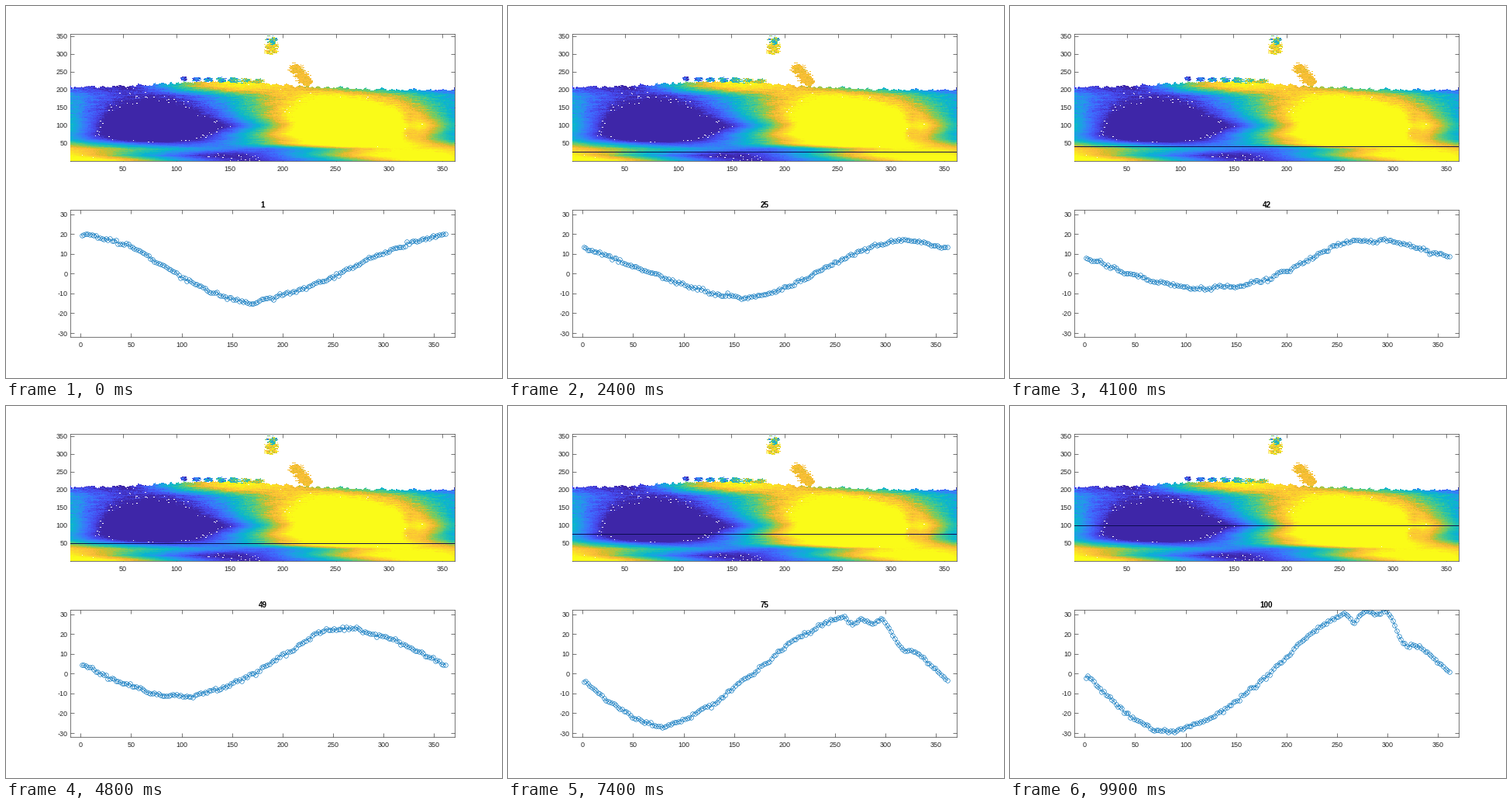
These frames come from a looping animation (640x480 px, 10 s). A matplotlib script:

```python
import numpy as np
import matplotlib.pyplot as plt
from matplotlib.animation import FuncAnimation
from matplotlib.colors import LinearSegmentedColormap

FRAMES = 100
ROWS, COLS = 355, 361
DPI = 100
INK = "#262626"
BLUE = "#0072bd"
PX = 72 / DPI  # one pixel in points

plt.rcParams.update({
    "font.family": "Liberation Sans",
    "font.size": 9 * PX,
    "axes.unicode_minus": False,
    "axes.linewidth": 0.45,
    "axes.edgecolor": INK,
})

rng = np.random.default_rng(7)
cols = np.arange(1, COLS + 1)
rows = np.arange(1, ROWS + 1)
x, y = np.meshgrid(cols, rows)


def smooth(a, n):
    """Moving average along the last axis, with edge padding."""
    pad = [(0, 0)] * (a.ndim - 1) + [(n // 2, n // 2)]
    return np.apply_along_axis(np.convolve, -1, np.pad(a, pad, "edge"),
                               np.ones(n) / n, "valid")


def ease(t):
    return 0.35 * t + 0.65 * (0.5 - 0.5 * np.cos(np.pi * t))


def wave(valley, low, peak, high, rise=1.0, fall=1.0):
    """One 360-degree swing between a valley and a peak."""
    turn = (cols - valley) % 360
    span = peak - valley
    up = ease(np.clip(turn / span, 0, 1) ** rise)
    down = ease(np.clip((turn - span) / (360 - span), 0, 1) ** fall)
    return smooth(low + (high - low) * (up - down), 7)


def bell(center, width):
    return np.exp(-((cols - center) / width) ** 2)


# Swing at a few ranges; the rows between are blended.
swings = {
    1: wave(165, -14.5, 368, 20),
    16: wave(147, -16, 320, 20),
    34: wave(180, -9, 312, 15),
    49: wave(92, -11.5, 257, 24, rise=1.35),
    62: wave(78, -21.5, 278, 26.5, fall=0.85),
    75: wave(77, -27, 265, 30),
    100: wave(75, -29.5, 265, 32, rise=1.25, fall=1.15),
    125: wave(80, -25, 262, 28),
    182: wave(75, -14.5, 240, 15.5),
    208: wave(55, -15, 160, 15, rise=0.8, fall=0.85),
}


def build_field():
    table = np.array(list(swings.values()))
    base = np.array([np.interp(rows, list(swings), c) for c in table.T]).T
    notch = 5 * bell(298, 8) - 6 * bell(266, 5) - 6 * bell(317, 9)
    base += np.interp(rows, [50, 80, 110, 150], [0, 1, 1, 0])[:, None] * notch
    grain = rng.normal(0, 0.38, (ROWS, COLS))
    drift = smooth(rng.normal(0, 1.3, (ROWS, COLS)), 9)
    gain = np.interp(rows, [100, 150], [1, 2])[:, None]
    return base + gain * (grain + drift)


def build_map(field):
    """Field as displayed: skyline cut off, clumps above it, stray gaps."""
    img = field.copy()
    skyline = 207 - 0.022 * cols + 19 * bell(145, 75)
    skyline += smooth(rng.normal(0, 3.5, COLS), 3)
    img[y > skyline] = np.nan

    def clump(cx, cy, rx, ry, value, spread, rough=0.18):
        d = np.hypot((x - cx) / rx, (y - cy) / ry)
        d += smooth(rng.normal(0, 2 * rough, d.shape), 3)
        hit = d < 1
        img[hit] = (value + rng.normal(0, spread, d.shape))[hit]

    for t in np.linspace(0, 1, 7):
        clump(107 + 70 * t, 230 - 6 * t, 3 + 3 * t, 7, -12 + 19 * t, 4)
    for t in np.linspace(0, 1, 4):
        clump(213 + 9 * t, 257 - 34 * t, 6, 14, 9.5, 0.8)
    clump(190, 316, 5.5, 17, 11, 3, 0.25)
    clump(190, 337, 4.5, 10, 1, 5, 0.25)

    chance = rng.random(field.shape)
    img[(np.abs(field + 14.5) < 1.5) & (chance < 0.05)] = np.nan
    img[(np.abs(field - 14) < 1.2) & (chance < 0.01)] = np.nan
    return img


def style(ax):
    ax.tick_params(direction="in", length=5 * PX, width=0.45, color=INK,
                   labelcolor=INK, top=True, right=True)
    ax.tick_params(axis="x", pad=6 * PX)
    ax.tick_params(axis="y", pad=4 * PX)


stops = [0, 0.11, 0.22, 0.33, 0.44, 0.56, 0.67, 0.77, 0.82, 0.88, 1]
shades = ["#3e26a8", "#4747eb", "#3e6fff", "#2797eb", "#08b5d0", "#31c69f",
          "#81cc59", "#dcbd29", "#fabb3a", "#fccf30", "#fafb18"]
parula = LinearSegmentedColormap.from_list("parula", list(zip(stops, shades)))
parula.set_bad(alpha=0)

field = build_field()

fig = plt.figure(figsize=(640 / DPI, 480 / DPI), dpi=DPI, facecolor="white")
top = fig.add_axes([0.13, 0.5838, 0.774, 0.3412])
low = fig.add_axes([0.13, 0.11, 0.774, 0.3412])

# The map lies over the frame lines and ticks.
top.imshow(build_map(field), cmap=parula, vmin=-15, vmax=15, origin="lower",
           extent=(0.5, COLS + 0.5, 0.5, ROWS + 0.5), aspect="auto",
           interpolation="nearest", zorder=3)
top.set_xticks(range(50, 351, 50))
top.set_yticks(range(50, 351, 50))
style(top)
cursor, = top.plot([0.5, COLS + 0.5], [1, 1], color="#0c0c50", lw=0.7,
                   zorder=4)
top.set_xlim(0.5, COLS + 0.5)
top.set_ylim(0.5, ROWS + 0.5)

curve, = low.plot(cols[::2], field[0, ::2], "o-", color=BLUE, lw=0.45,
                  ms=5.6 * PX, mfc="none", mew=0.45)
low.set_xlim(-10, 370)
low.set_ylim(-32, 32)
low.set_xticks(range(0, 351, 50))
low.set_yticks(range(-30, 31, 10))
style(low)
title = low.set_title("1", fontsize=9.9 * PX, fontweight="bold",
                      color="black", pad=3 * PX)


def update(i):
    cursor.set_ydata([i + 1, i + 1])
    curve.set_ydata(field[i, ::2])
    title.set_text(str(i + 1))
    return cursor, curve, title


anim = FuncAnimation(fig, update, frames=FRAMES, interval=100, repeat=True,
                     repeat_delay=0, blit=False)
plt.show()
```
